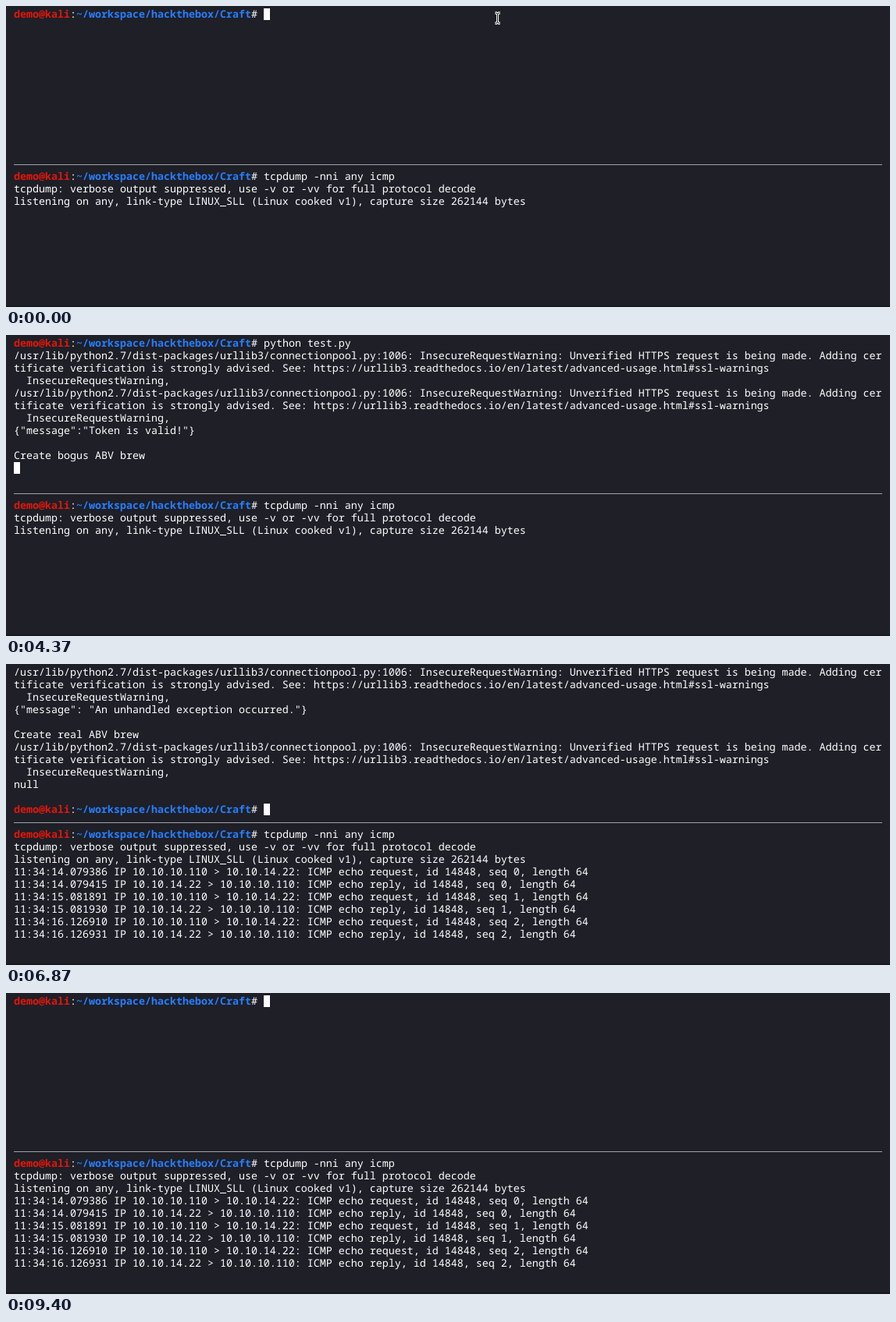
An HTML page that plays this animation: 1132 by 386 pixels, repeating every 9.96 s.

```html
<!DOCTYPE html>
<html lang="en">
<head>
<meta charset="utf-8">
<title>Terminal session</title>
<style>
  html, body { margin: 0; width: 100%; height: 100%; overflow: hidden; background: #1e1f27; }
  svg { display: block; }
  text {
    font: 13.3333px "Noto Sans Mono", "DejaVu Sans Mono", monospace;
    fill: #fff;
    white-space: pre;
    text-rendering: geometricPrecision;
    font-variant-ligatures: none;
  }
  .host, .path { font-weight: 700; }
  .host { fill: #e3170b; }
  .path { fill: #277fff; }
</style>
</head>
<body>
<svg width="1132" height="386" viewBox="0 0 1132 386">
  <rect width="1132" height="386" fill="#1e1f27"/>
  <rect y="384" width="1132" height="2" fill="#18191f"/>
  <rect x="10" y="203" width="1112" height="1" fill="#a3a4a8"/>
  <g id="rows"></g>
  <rect id="cursor" width="8" height="15" fill="#fff"/>
  <g id="pointer" fill="none">
    <path id="beam" d="M-3 -6.5H-1.5L0 -5.5L1.5 -6.5H3M0 -5.5V5.5M-3 6.5H-1.5L0 5.5L1.5 6.5H3" stroke="#fff" stroke-width="3"/>
    <use href="#beam"/>
    <path d="M-3 -6.5H-1.5L0 -5.5L1.5 -6.5H3M0 -5.5V5.5M-3 6.5H-1.5L0 5.5L1.5 6.5H3" stroke="#111" stroke-width="1"/>
  </g>
</svg>
<script>
const LOOP = 9960, LEFT = 10, CELL = 8, ROW = 16, TOP_ROWS = 12, BOTTOM_START = 13;
const NS = "http://www.w3.org/2000/svg";
const HOST = "demo@kali", PATH = "~/workspace/hackthebox/Craft";
const PROMPT = `${HOST}:${PATH}# `;
const COMMAND = "python test.py";
const KEY_TIMES = [970, 1070, 1170, 1270, 1350, 1430, 1570, 1900, 2030, 2160, 2330, 2330, 2500, 2630];
const ENTER = 3530, CLEAR = 9130;

const WARNING = [
  "/usr/lib/python2.7/dist-packages/urllib3/connectionpool.py:1006: InsecureRequestWarning: Unverified HTTPS request is being made. Adding cer",
  "tificate verification is strongly advised. See: https://urllib3.readthedocs.io/en/latest/advanced-usage.html#ssl-warnings",
  "  InsecureRequestWarning,"
];
const OUTPUT = [
  [3830, WARNING],
  [4070, WARNING],
  [4270, ['{"message":"Token is valid!"}', "", "Create bogus ABV brew"]],
  [4400, WARNING],
  [6620, ['{"message": "An unhandled exception occurred."}', "", "Create real ABV brew"]],
  [6740, WARNING],
  [6800, ["null", ""]]
];
const FINISHED = 6800;

const HEADER = [
  PROMPT + "tcpdump -nni any icmp",
  "tcpdump: verbose output suppressed, use -v or -vv for full protocol decode",
  "listening on any, link-type LINUX_SLL (Linux cooked v1), capture size 262144 bytes"
];
// Arrival time, request stamp, reply stamp
const PINGS = [
  [4540, "14.079386", "14.079415"],
  [5540, "15.081891", "15.081930"],
  [6590, "16.126910", "16.126931"]
];

const $ = id => document.getElementById(id);

function packet(stamp, from, to, kind, seq) {
  return `11:34:${stamp} IP ${from} > ${to}: ICMP echo ${kind}, id 14848, seq ${seq}, length 64`;
}

function topLines(t) {
  if (t >= CLEAR) return [PROMPT];
  const typed = KEY_TIMES.filter(k => k <= t).length;
  const lines = [PROMPT + COMMAND.slice(0, typed)];
  if (t < ENTER) return lines;
  for (const [at, text] of OUTPUT) if (t >= at) lines.push(...text);
  lines.push(t >= FINISHED ? PROMPT : "");
  return lines.slice(-TOP_ROWS);
}

function bottomLines(t) {
  const lines = [...HEADER];
  PINGS.forEach(([at, request, reply], seq) => {
    if (t < at) return;
    lines.push(packet(request, "10.10.10.110", "10.10.14.22", "request", seq),
               packet(reply, "10.10.14.22", "10.10.10.110", "reply", seq));
  });
  return lines;
}

function addSpan(parent, text, className) {
  const span = document.createElementNS(NS, "tspan");
  span.textContent = text;
  if (className) span.setAttribute("class", className);
  parent.append(span);
}

function addLine(line, row) {
  const text = document.createElementNS(NS, "text");
  text.setAttribute("x", LEFT);
  text.setAttribute("y", 15 + row * ROW);
  if (line.startsWith(PROMPT)) {
    addSpan(text, HOST, "host");
    addSpan(text, ":");
    addSpan(text, PATH, "path");
    addSpan(text, "# " + line.slice(PROMPT.length));
  } else {
    addSpan(text, line);
  }
  $("rows").append(text);
}

let shown = "";
function render(t) {
  const top = topLines(t), bottom = bottomLines(t);
  const key = [...top, "|", ...bottom].join("\n");
  if (key !== shown) {
    shown = key;
    $("rows").replaceChildren();
    top.forEach(addLine);
    bottom.forEach((line, i) => addLine(line, BOTTOM_START + i));
    $("cursor").setAttribute("x", LEFT + top.at(-1).length * CELL);
    $("cursor").setAttribute("y", 3 + (top.length - 1) * ROW);
  }
  // The pointer leaves through the top edge.
  const p = Math.min(1, Math.max(0, t / 200));
  $("pointer").setAttribute("transform", `translate(${629.5 + 3 * p} ${15.5 - 26 * p * p})`);
  $("pointer").setAttribute("visibility", p < 1 ? "visible" : "hidden");
}

const start = performance.now();
function tick() {
  render((performance.now() - start) % LOOP);
  requestAnimationFrame(tick);
}
render(0);
requestAnimationFrame(tick);
</script>
</body>
</html>
```
